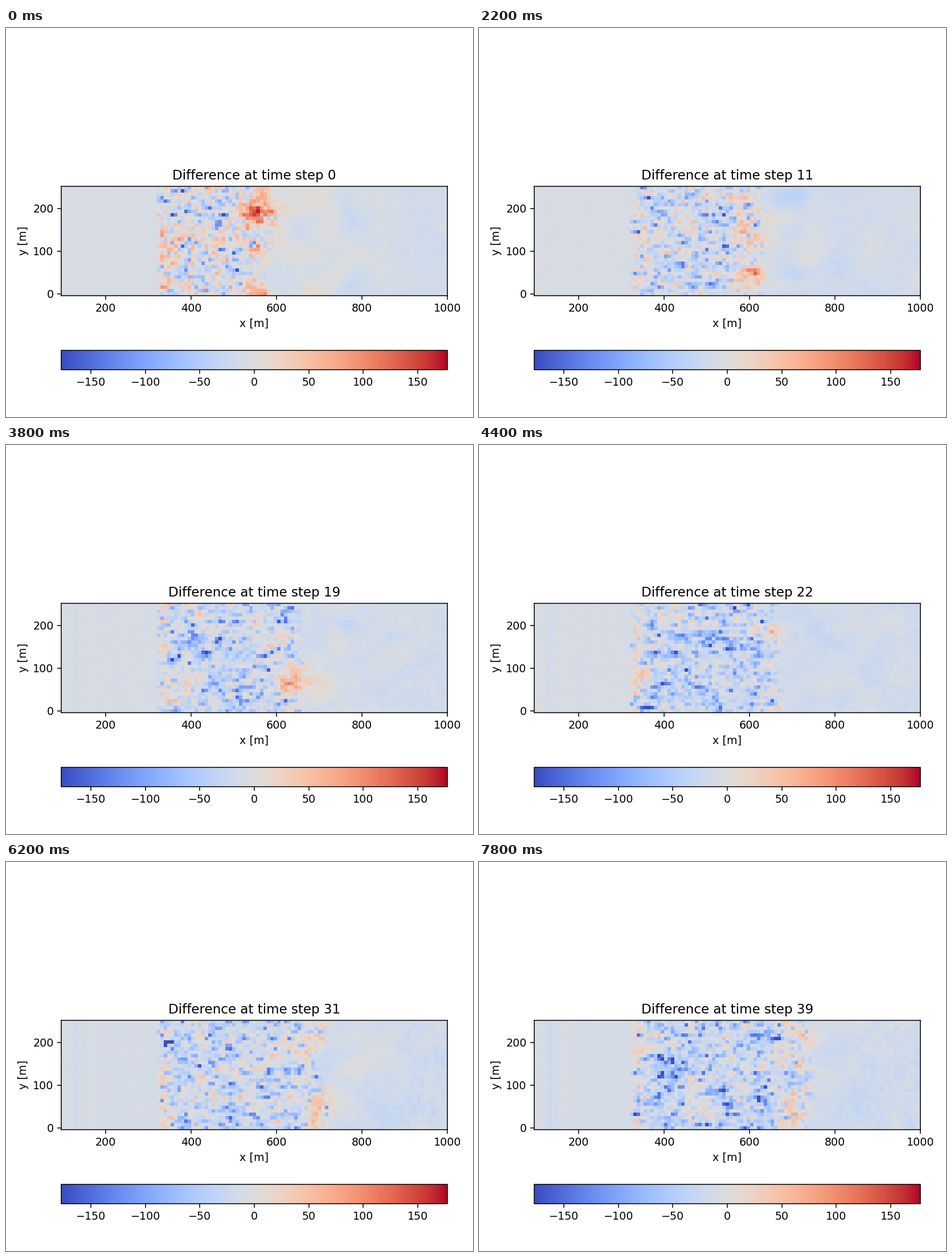
Animation, 820 px wide and 683 px high, one loop 8000 ms. Source, as a matplotlib script:

```python
import numpy as np
import matplotlib.pyplot as plt
from matplotlib.animation import FuncAnimation

W, H, DPI = 820, 683, 138
STEPS, INTERVAL = 40, 200
NX, NY, CELL = 113, 32, 8
VMAX = 177.2
KEY_GAP = 2          # steps between independent noise fields
DRIFT = 0.5          # rightward flow, cells per step

plt.rcParams["font.family"] = "DejaVu Sans"
rng = np.random.default_rng(12)
x = 100 + CELL * np.arange(NX)[None, :]


def blurred_keys(sx, sy):
    """Unit-variance random fields, smoothed over sx by sy cells."""
    n = STEPS // KEY_GAP + 2
    fx, fy = np.fft.fftfreq(NX)[None, :], np.fft.fftfreq(NY)[:, None]
    gain = np.exp(-2 * np.pi**2 * ((fx * sx)**2 + (fy * sy)**2))
    a = np.fft.ifft2(np.fft.fft2(rng.normal(size=(n, NY, NX))) * gain).real
    return a / a.std(axis=(1, 2), keepdims=True)


FINE = blurred_keys(0.5, 0.25)
STREAK = blurred_keys(1.3, 0.45)
COARSE = blurred_keys(2.6, 2)
GRAIN = blurred_keys(0.4, 0.4)
STRIPES = rng.normal(size=(1, NX))


def noise(keys, t, drift=0.0):
    k, part = divmod(t, KEY_GAP)
    a = part / KEY_GAP * np.pi / 2
    mix = np.cos(a) * keys[k] + np.sin(a) * keys[k + 1]
    return np.roll(mix, round(drift * t), axis=1)


def bump(u, centre, width):
    return np.exp(-0.5 * ((u - centre) / width)**2)


def ramp(u):
    return 1 / (1 + np.exp(-np.clip(u, -40, 40)))


def calm(t, age, coarse):
    """Quiet flow left of the mixing zone and ahead of its front."""
    grain = noise(GRAIN, t)
    left = -8 - 3 * age + (0.8 + age) * STRIPES * bump(x, 110, 60)
    left = left - 9 * age**2 * bump(x, 132, 4) + 0.7 * grain
    right = -10 - 5 * age - 3 * ramp((x - 800) / 60)
    right = right + (3 + 6 * bump(x, 680, 90)) * coarse
    right = right + (2 + 4 * age * ramp((x - 850) / 40)) * grain
    return np.where(x < 325, left, right)


def mixing(t, late, coarse):
    """Streaky zone, drifting from balanced to mostly negative values."""
    n = 0.95 * noise(FINE, t, DRIFT) + 0.3 * coarse
    low, high = np.minimum(n, 0), np.maximum(n, 0)
    v = -4 - 20 * late + (34 - 10 * late) * high
    v = v + 25 * low * (1 - 0.5 * low)
    return v - 50 * np.maximum(noise(STREAK, t, DRIFT) - 1, 0)


def field(t):
    age, late = t / (STEPS - 1), min(t / 18, 1)
    coarse = noise(COARSE, t, DRIFT)
    front = 580 + 4 * t + 14 * coarse
    edge = 325 + 2 * noise(GRAIN, t)
    zone = ramp((x - edge) / 1.5) * ramp((front - x) / 9)
    v = calm(t, age, coarse) * (1 - zone) + mixing(t, late, coarse) * zone
    v = v + zone * (20 + 8 * late) * bump(x, 336, 14)
    warm = 12 + 20 * np.maximum(coarse, 0)
    return v + warm * bump(x, 555 + 4 * t, 32)


def box(left, top, width, height):
    return [left / W, 1 - (top + height) / H, width / W, height / H]


fig = plt.figure(figsize=((W + 1e-6) / DPI, (H + 1e-6) / DPI), dpi=DPI)
ax = fig.add_axes(box(97, 277.8, NX * 6, NY * 6))
im = ax.imshow(field(0), cmap="coolwarm", vmin=-VMAX, vmax=VMAX,
               origin="lower", extent=(96, 1000, -4, 252), aspect="auto",
               interpolation="nearest")
ax.set_xticks(range(200, 1001, 200))
ax.set_yticks(range(0, 201, 100))
ax.set_xlabel("x [m]")
ax.set_ylabel("y [m]")
title = ax.set_title("Difference at time step 0")

cax = fig.add_axes(box(97, 566, NX * 6, 33.9))
fig.colorbar(im, cax=cax, orientation="horizontal",
             ticks=range(-150, 151, 50))


def update(t):
    im.set_data(field(t))
    title.set_text(f"Difference at time step {t}")
    return im, title


anim = FuncAnimation(fig, update, frames=STEPS, interval=INTERVAL,
                     repeat=True, repeat_delay=0, blit=False)
plt.show()
```
